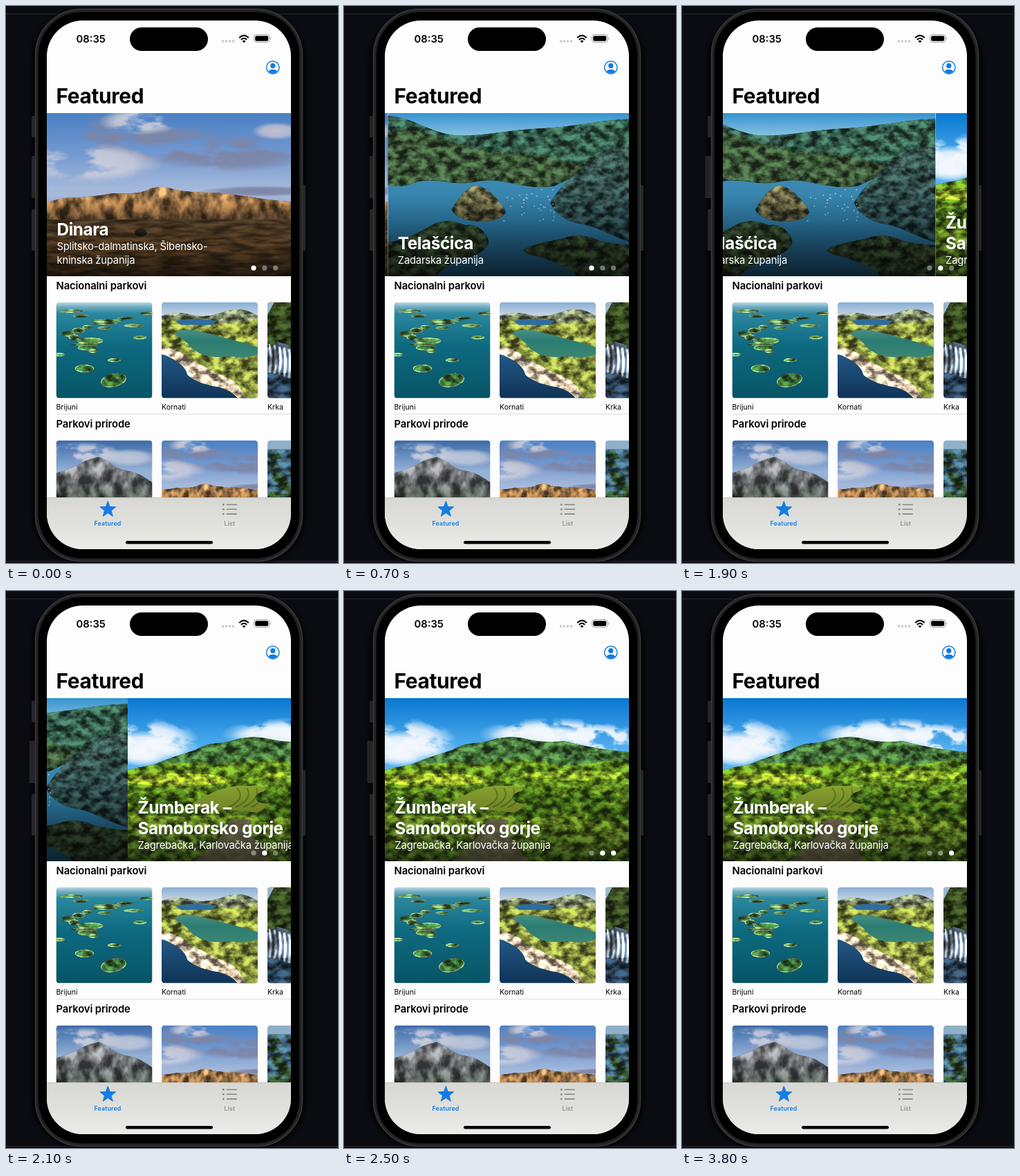
Write an HTML page that moves like this. It is 480 px wide and 806 px high and loops after 3.9 s.

```html
<!DOCTYPE html>
<html lang="hr">
<head>
<meta charset="utf-8">
<title>Parkovi</title>
<style>
  html, body { margin: 0; width: 100%; height: 100%; overflow: hidden; background: #0b0c12; }
  svg { display: block; width: 100vw; height: 100vh; }
  text { font-family: Inter, "Liberation Sans", sans-serif; }
  .large { font-size: 29.8px; font-weight: 700; letter-spacing: -.35px; }
  .time { font-size: 14.8px; font-weight: 600; }
  .head { font-size: 14.8px; font-weight: 600; letter-spacing: -.1px; }
  .label { font-size: 10.5px; }
  .tab { font-size: 8.8px; text-anchor: middle; letter-spacing: .15px; }
  .title { font-size: 24.3px; font-weight: 700; letter-spacing: -.4px; fill: #fff; }
  .sub { font-size: 14.8px; letter-spacing: -.22px; fill: #fff; }
</style>
</head>
<body>
<svg id="stage" viewBox="0 0 480 806" preserveAspectRatio="none"></svg>
<script>
const LOOP = 3900, STEP = 100, PAGE = 353, CARD = 139;

let seed = 7;
const random = () => (seed = (seed * 16807) % 2147483647) / 2147483647;
const between = (a, b) => a + (b - a) * random();
const repeat = (n, make) => Array.from({ length: n }, (_, i) => make(i)).join('');

const rect = (x, y, w, h, fill, extra = '') =>
  `<rect x="${x}" y="${y}" width="${w}" height="${h}" fill="${fill}" ${extra}/>`;
const oval = (x, y, rx, ry, fill, extra = '') =>
  `<ellipse cx="${x}" cy="${y}" rx="${rx}" ry="${ry}" fill="${fill}" ${extra}/>`;
const path = (d, fill, extra = '') => `<path d="${d}" fill="${fill}" ${extra}/>`;
const text = (x, y, cls, str, extra = '') => `<text x="${x}" y="${y}" class="${cls}" ${extra}>${str}</text>`;
const stops = list => list.map(([at, color, alpha = 1]) =>
  `<stop offset="${at}" stop-color="${color}" stop-opacity="${alpha}"/>`).join('');
const gradient = (id, ...list) =>
  `<linearGradient id="${id}" x1="0" y1="0" x2="0" y2="1">${stops(list)}</linearGradient>`;
const puff = (id, color) =>
  `<radialGradient id="${id}">${stops([[0, color], [.6, color, .85], [1, color, 0]])}</radialGradient>`;

// Multiplies a picture by fractal noise, for woods, rock and grass.
const grain = (id, freq, depth) =>
  `<filter id="${id}" x="0" y="0" width="1" height="1" color-interpolation-filters="sRGB">
    <feTurbulence type="fractalNoise" baseFrequency="${freq}" numOctaves="4" seed="5"/>
    <feColorMatrix values="0 0 0 2.4 -.7 0 0 0 2.4 -.7 0 0 0 2.4 -.7 0 0 0 0 1" result="noise"/>
    <feComposite in="SourceGraphic" in2="noise" operator="arithmetic" k1="${2 * depth}" k2="${1 - depth}"/>
    <feComposite in2="SourceAlpha" operator="in"/>
  </filter>`;

// Keeps only the dense parts of fractal noise, for clouds.
const wisp = (id, freq) =>
  `<filter id="${id}" color-interpolation-filters="sRGB">
    <feTurbulence type="fractalNoise" baseFrequency="${freq}" numOctaves="5" seed="11"/>
    <feColorMatrix values="0 0 0 0 1 0 0 0 0 1 0 0 0 0 1 0 0 0 6 -2.3" result="noise"/>
    <feComposite in="SourceGraphic" in2="noise" operator="in"/>
  </filter>`;

const layer = (filter, ...parts) => `<g filter="url(#${filter})">${parts.join('')}</g>`;

function dinara() {
  const ridge = 'M0 130Q18 122 38 122T95 116Q135 118 150 109Q168 104 180 109T245 115Q275 118 300 122T353 128V160H0Z';
  return rect(0, 0, PAGE, 170, 'url(#duskSky)') +
    layer('streaks',
      oval(130, 38, 130, 40, 'url(#grayPuff)'), oval(265, 58, 120, 28, 'url(#grayPuff)'),
      oval(60, 72, 110, 30, 'url(#palePuff)'), oval(135, 12, 60, 20, 'url(#palePuff)')) +
    oval(332, 26, 36, 13, 'url(#peachPuff)', 'opacity=".75"') +
    oval(310, 113, 90, 8, 'url(#grayPuff)') +
    layer('rough', path(ridge, 'url(#rock)')) +
    layer('grass', rect(0, 154, PAGE, 82, 'url(#steppe)'), oval(136, 173, 9, 6, '#292416'));
}

function bay() {
  const far = 'M0 4C35 6 50 22 85 30S170 24 220 22S300 10 353 8V110H0Z';
  const left = 'M0 28Q30 18 65 32T135 52C170 60 190 52 220 60S280 72 300 78L240 106C190 112 170 92 130 99C95 107 70 92 42 100Q18 110 0 104Z';
  const right = 'M235 130C250 103 268 92 286 73C310 53 330 49 353 51V187C325 180 305 164 276 160Q245 153 235 130Z';
  const island = 'M92 140C102 123 114 106 128 105C145 107 162 126 171 143Q163 158 132 157Q100 155 92 140Z';
  const front = 'M0 187C30 184 50 168 72 158Q90 153 112 162C130 158 146 176 146 188Q137 208 98 212L68 236H0Z';
  const corner = 'M195 198C215 186 240 186 260 179Q285 174 304 184Q330 190 353 191V236H275Q238 210 204 205Z';
  return rect(0, 0, PAGE, 60, 'url(#baySky)') +
    layer('woods', path(far, '#345c4b')) +
    rect(0, 88, PAGE, 148, 'url(#bayWater)') +
    layer('woods', path(left, '#3b5537'), path(right, 'url(#shadeHill)'), path(island, 'url(#islet)'),
      path(front, '#2f4229'), path(corner, '#2d4029')) +
    repeat(34, () => oval(between(168, 246), between(108, 160), 1.1, .8, '#dbe8ee', 'opacity=".8"'));
}

function hills() {
  const ridge = 'M28 100Q60 86 98 75C120 61 135 68 155 60Q182 53 205 59T260 62Q300 73 353 78V130H0Z';
  const slope = 'M0 104C35 94 70 96 103 93C150 99 200 82 240 94S320 84 353 91V185H0Z';
  return rect(0, 0, PAGE, 120, 'url(#summerSky)') +
    layer('heaps',
      oval(30, 64, 75, 36, 'url(#whitePuff)'), oval(245, 52, 110, 24, 'url(#whitePuff)'),
      oval(325, 62, 50, 24, 'url(#whitePuff)')) +
    oval(22, 72, 62, 26, 'url(#whitePuff)') + oval(232, 54, 82, 15, 'url(#whitePuff)') +
    layer('woods', path(ridge, '#436f38'), path(slope, '#5d841f'),
      oval(70, 118, 80, 9, '#98b02c'), oval(275, 112, 80, 7, '#7c9d27')) +
    path('M88 156C110 142 140 124 174 127Q202 125 217 142L190 166Z', '#8fa832') +
    repeat(4, i => path(`M${145 + 11 * i} 158Q${172 + 10 * i} 146 ${158 + 14 * i} 130`, 'none',
      'stroke="#4e7320" stroke-width="2" opacity=".7"')) +
    layer('woods',
      rect(0, 170, PAGE, 66, 'url(#meadow)'),
      repeat(26, () => oval(between(195, 353), between(140, 174), between(8, 16), 9, '#47711b')),
      repeat(14, () => oval(between(0, 82), between(132, 168), between(6, 13), 6, '#456d1c'))) +
    path('M145 178Q168 172 179 177L176 192L205 236H95Q133 212 145 178Z', '#8f8069', 'opacity=".8"');
}

function islands() {
  const isle = (x, y, w, h) =>
    oval(x, y, w + 1, h + 1, '#8fa873') + oval(x, y, w - .4, h - .5, '#3b6e35');
  return rect(0, 0, CARD, CARD, 'url(#sea)') +
    layer('woods',
      repeat(9, i => isle(between(0, 60), 36 + 5 * i, between(6, 19), between(1.5, 4))),
      repeat(8, i => isle(between(20, 139), 13 + 3.5 * i, between(8, 22), 1.5)),
      isle(41, 96, 13, 5), isle(84, 84, 9, 2), isle(121, 51, 9, 2),
      `<g transform="rotate(-12 83 113)">${isle(83, 113, 18, 9)}</g>`);
}

function lake() {
  const land = 'M0 28Q30 20 60 27T139 25V139H119C105 121 88 118 72 111C55 104 52 92 38 86Q25 77 0 76Z';
  return rect(0, 0, CARD, 40, 'url(#coastSky)') +
    rect(0, 60, CARD, 79, 'url(#deep)') +
    layer('woods',
      path('M0 20Q20 12 42 18T90 14T139 20V42H0Z', '#7f8a68'), path(land, '#87923f'),
      path('M0 62Q29 70 40 84C56 88 66 98 82 104Q109 111 122 139H110Q99 127 82 123Q50 118 37 105Q34 88 0 75Z', '#d9c4a8')) +
    path('M20 27Q50 22 80 27L72 33H28Z', '#2f6ca0') +
    path('M18 46Q30 36 58 43Q102 54 139 65V76Q118 83 98 78Q65 84 44 67Q34 54 18 46Z', 'url(#lagoon)');
}

function falls() {
  return layer('woods', rect(0, 0, 40, CARD, '#34461f'), rect(0, 96, 40, 43, '#2b4257')) +
    path('M0 0H10L0 18Z', '#9cb9ce') +
    layer('rough', path('M0 66L14 57L34 63V103H0Z', '#55697c'),
      repeat(5, i => path(`M${3 + 7 * i} ${60 + 2 * i}q4 20 0 42`, 'none', 'stroke="#d6e3ee" stroke-width="3.5"')));
}

function crag() {
  const ridge = 'M0 47Q20 42 34 34T62 24Q70 27 81 35T108 45Q122 48 139 61V139H0Z';
  return rect(0, 0, CARD, 90, 'url(#cragSky)') +
    layer('heaps', oval(40, 20, 60, 18, 'url(#palePuff)')) +
    oval(105, 25, 42, 13, 'url(#palePuff)', 'opacity=".85"') +
    layer('rough', path(ridge, 'url(#cliff)'));
}

const marsh = () => rect(0, 0, 40, CARD, '#8fb0c9') +
  layer('woods', rect(0, 13, 40, 126, '#3b5d70'),
    repeat(22, () => oval(between(0, 36), between(18, 90), between(4, 10), 3, '#35522f')));

function banner(index, scene, titles, subs) {
  const titleBase = 196.5 - 19.5 * (subs.length - 1);
  const lines = (list, cls, last, gap) =>
    list.map((s, i) => text(14.5, last - gap * (list.length - 1 - i), cls, s)).join('');
  return `<svg x="${index * PAGE}" width="${PAGE}" height="236">${scene}` +
    rect(0, 0, PAGE, 236, 'url(#shade)') + lines(titles, 'title', titleBase, 30) + lines(subs, 'sub', 217.5, 19.5) + '</svg>';
}

const card = (x, y, scene) => `<g transform="translate(${x} ${y})" clip-path="url(#card)">${scene}</g>`;

const defs = `<defs>
  <filter id="blur"><feGaussianBlur stdDeviation="2.4"/></filter>
  <clipPath id="screen"><rect x="59" y="21" width="353" height="765" rx="52"/></clipPath>
  <clipPath id="window"><rect x="59" y="155" width="353" height="236"/></clipPath>
  <clipPath id="card"><rect width="139" height="139" rx="4.5"/></clipPath>` +
  grain('woods', '.07 .1', .6) + grain('rough', '.06 .04', .55) + grain('grass', '.03 .15', .35) +
  wisp('streaks', '.015 .035') + wisp('heaps', '.03 .05') +
  puff('grayPuff', '#7d85a6') + puff('palePuff', '#c9cddc') + puff('peachPuff', '#e0d0d3') + puff('whitePuff', '#f4f8fd') +
  gradient('shade', [0, '#000', 0], [.5, '#000', 0], [1, '#000', .6]) +
  gradient('duskSky', [0, '#4a80c4'], [.35, '#7399d0'], [.65, '#a6b9db']) +
  gradient('rock', [0, '#b98f5c'], [.5, '#8f683f'], [1, '#55402a']) +
  gradient('steppe', [0, '#53402a'], [.5, '#70502f'], [1, '#4e371f']) +
  gradient('baySky', [0, '#3493ce'], [.5, '#82bde0']) +
  gradient('bayWater', [0, '#3f8ab4'], [.45, '#2f7faa'], [1, '#1d5579']) +
  gradient('shadeHill', [0, '#3a5650'], [1, '#233d40']) +
  gradient('islet', [0, '#75704c'], [1, '#4a4a33']) +
  gradient('summerSky', [0, '#0878d1'], [.65, '#58b3f1']) +
  gradient('meadow', [0, '#7ea52b'], [.5, '#6f972d'], [1, '#567e29']) +
  gradient('sea', [0, '#bddce7'], [.05, '#6fabc0'], [.12, '#2a879d'], [.45, '#0e6a80'], [1, '#075466']) +
  gradient('coastSky', [0, '#86aed5'], [.5, '#c9d8e4']) +
  gradient('deep', [0, '#28618f'], [1, '#0f3358']) +
  gradient('lagoon', [0, '#4a8f84'], [.4, '#2a7c72'], [1, '#3c8673']) +
  gradient('cragSky', [0, '#3b69a8'], [.5, '#96b2d7']) +
  gradient('cliff', [0, '#85868a'], [.35, '#6a6d6f'], [.6, '#3f4a3c'], [1, '#2f3a2c']) +
  gradient('bar', [0, '#d7d7d3'], [.5, '#e0e1dc'], [1, '#ebebe8']) + '</defs>';

const star = Array.from({ length: 10 }, (_, i) => {
  const r = i % 2 ? 5 : 12, a = Math.PI * (i / 5 - .5);
  return `${147.3 + r * Math.cos(a)},${728.6 + r * Math.sin(a)}`;
}).join(' ');

const sideButton = (x, y, w, h, extra = '') => rect(x, y, w, h, '#252527', `rx="1.5" ${extra}`);

const body =
  rect(0, 0, 480, 806, '#0b0c12') + rect(0, 11, 480, 1, '#25262c') + rect(0, 803, 480, 1, '#33262a') +
  rect(36, 8, 399, 798, '#040406', 'rx="70" opacity=".6" filter="url(#blur)"') +
  sideButton(37, 159, 7, 31) + sideButton(37, 217, 9, 61, 'id="volume"') +
  sideButton(37, 294, 7, 60) + sideButton(427, 259, 6, 95) +
  rect(42.5, 4.5, 386, 799, '#242425', 'rx="67" stroke="#39393b" stroke-width="1.5"') +
  rect(46.5, 8.5, 378, 791, '#000', 'rx="63" stroke="#161617"');

const status =
  text(101.5, 53, 'time', '08:35') + rect(179, 31, 113, 34, '#000', 'rx="17"') +
  repeat(4, i => oval(313.5 + 5 * i, 51, 1.7, 1.7, '#c5c5c7')) +
  '<g fill="none" stroke="#000" stroke-width="2"><path d="M337.2 46Q344 39.3 350.8 46"/><path d="M339.8 48.8Q344 44.8 348.2 48.8"/></g>' +
  path('M341.5 50.7Q344 48.8 346.5 50.7L344 53.2Z', '#000') +
  rect(358.5, 41.5, 22.5, 11, 'none', 'rx="3.3" stroke="#a2a2a4"') + rect(360.2, 43.2, 19, 7.6, '#000', 'rx="2"') +
  path('M382.3 45Q384.5 47 382.3 49Z', '#a2a2a4');

const profile =
  '<clipPath id="face"><circle cx="385.8" cy="89" r="8.5"/></clipPath>' +
  oval(385.8, 89, 9.2, 9.2, 'none', 'stroke="#147bdf" stroke-width="1.5"') +
  `<g clip-path="url(#face)">${oval(385.8, 86.4, 3.6, 3.6, '#147bdf')}${oval(385.8, 96.5, 6.7, 4.8, '#147bdf')}</g>`;

const dusk = dinara();
const banners =
  banner(0, dusk, ['Dinara'], ['Splitsko-dalmatinska, Šibensko-', 'kninska županija']) +
  banner(1, bay(), ['Telašćica'], ['Zadarska županija']) +
  banner(2, hills(), ['Žumberak –', 'Samoborsko gorje'], ['Zagrebačka, Karlovačka županija']);

const tabs =
  rect(59, 711, 353, 75, 'url(#bar)') + rect(59, 711, 353, .6, '#b9b9b6') +
  `<polygon points="${star}" fill="#147ce3" stroke="#147ce3" stroke-linejoin="round"/>` +
  text(147, 751.5, 'tab', 'Featured', 'fill="#147ce3" font-weight="600"') +
  repeat(3, i => oval(314.3, 721.5 + 6.8 * i, 1.4, 1.4, '#858582') +
    rect(318.5, 720.7 + 6.8 * i, 15.5, 1.6, '#858582', 'rx=".8"')) +
  text(323.3, 751.5, 'tab', 'List', 'fill="#858582" font-weight="500"') +
  rect(173, 774, 126, 4.6, '#000', 'rx="2.3"');

document.getElementById('stage').innerHTML = defs + body +
  '<g clip-path="url(#screen)">' + rect(59, 21, 353, 765, '#fdfdfd') + status + profile +
  text(72.5, 141, 'large', 'Featured') +
  `<g clip-path="url(#window)"><g id="strip">${banners}</g></g>` +
  repeat(3, i => oval(358 + 15.8 * i, 379.2, 3.6, 3.6, '#fff', 'class="dot"')) +
  text(72.5, 410, 'head', 'Nacionalni parkovi') +
  card(72.5, 428.5, islands()) + card(225, 428.5, lake()) + card(378, 428.5, falls()) +
  text(72.5, 584, 'label', 'Brijuni') + text(225, 584, 'label', 'Kornati') + text(378, 584, 'label', 'Krka') +
  rect(73, 590, 339, .8, '#d9d9da') + text(72.5, 610, 'head', 'Parkovi prirode') +
  card(72.5, 628.5, crag()) +
  card(225, 628.5, `<g transform="translate(-35) scale(.592)">${dusk}</g>`) +
  card(378, 628.5, marsh()) + tabs + '</g>';

const strip = document.getElementById('strip');
const volume = document.getElementById('volume');
const dots = document.querySelectorAll('.dot');

const ramp = (t, from, to) => Math.min(1, Math.max(0, (t - from) / (to - from)));

// Drag that speeds up, then settles; a higher power settles sooner.
const swipe = (t, start, power) => 1 - (1 - ramp(t, start, start + 700) ** 1.8) ** power;

function draw(t) {
  const pages = swipe(t, 100, 3.1) + swipe(t, 1800, 4.5);
  strip.setAttribute('transform', `translate(${59 - PAGE * pages} 155)`);
  const lit = [
    1 - ramp(t, 800, 1000),
    ramp(t, 700, 800) - ramp(t, 2500, 2700),
    ramp(t, 2400, 2500)
  ];
  dots.forEach((dot, i) => dot.setAttribute('opacity', .4 + .6 * lit[i]));
  volume.setAttribute('x', 37 - 3.5 * (ramp(t, 700, 1100) - ramp(t, 2500, 3100)));
}

const begin = performance.now();
let shown = -1;
function frame() {
  const t = Math.floor(((performance.now() - begin) % LOOP) / STEP) * STEP;
  if (t !== shown) draw(shown = t);
  requestAnimationFrame(frame);
}
frame();
</script>
</body>
</html>
```
